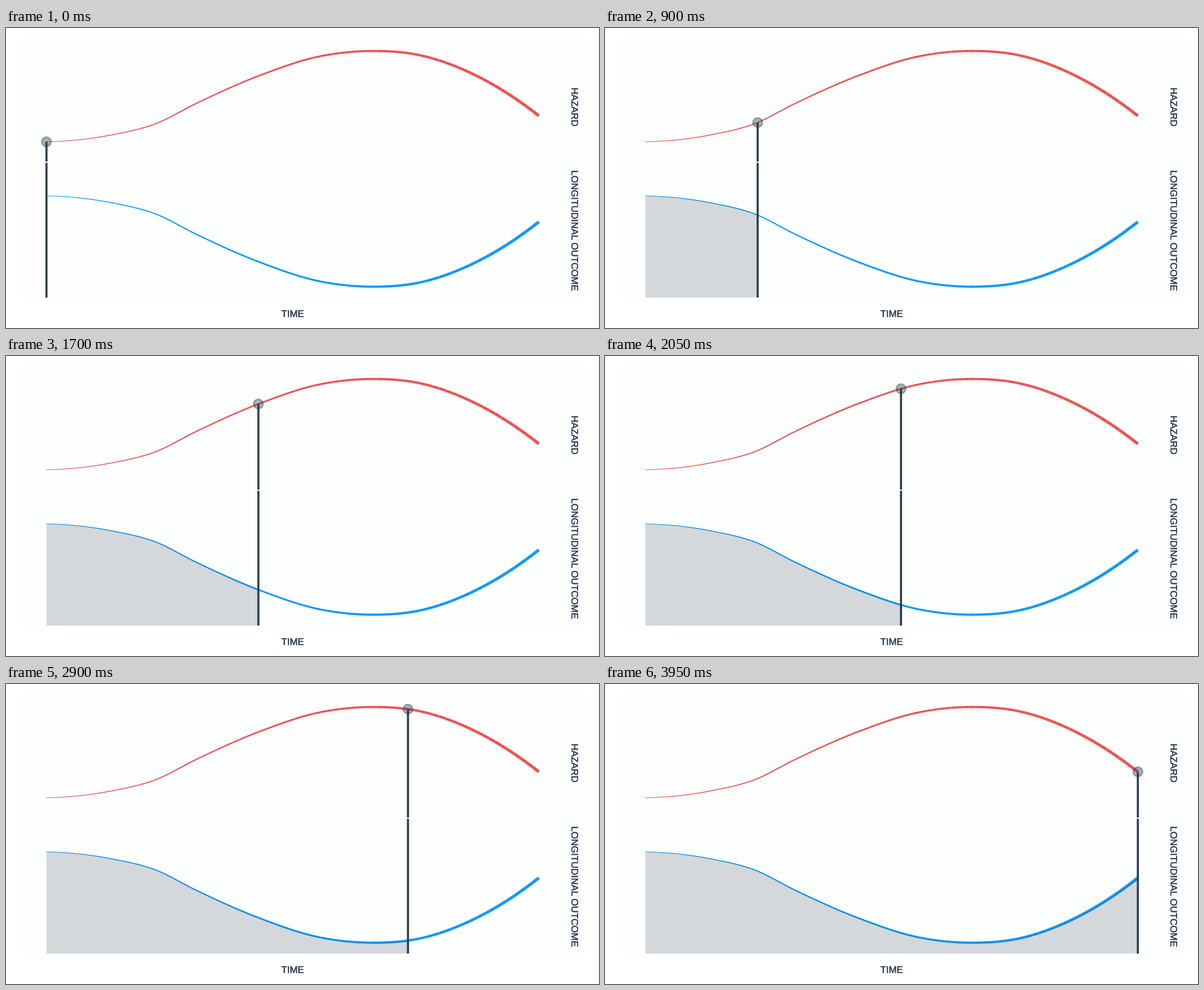
These frames come from a looping animation (1052x532 px, 4 s). A matplotlib script:

```python
import numpy as np
import matplotlib.pyplot as plt
from matplotlib.animation import FuncAnimation
from matplotlib.collections import LineCollection
from matplotlib.patches import Circle, Polygon, Rectangle
from matplotlib.patheffects import withStroke

W, H, DPI = 1052, 532, 100
PX = 72 / DPI
FRAMES, STEP = 80, 50
LEFT, RIGHT = 71.8, 945.3
GAP_TOP, GAP_BOTTOM, FLOOR = 237, 239, 478
MIRROR = 499.5
RED, BLUE, NAVY, PANEL = "#ea5455", "#1098f7", "#2c3e50", "#fdfefe"

# key points of the hazard curve, y pointing down
KEY_X = np.array([72, 193, 265, 337, 448, 558, 648, 740, 813, 945])
KEY_Y = np.array([201.8, 188.5, 170, 134, 85, 50, 40.8, 49.5, 74.5, 155.5])


def smooth(x):
    """Cubic Hermite curve whose slopes come from parabolas through neighbours."""
    slope = np.gradient(KEY_Y, KEY_X, edge_order=2)
    i = np.clip(np.searchsorted(KEY_X, x, side="right") - 1, 0, len(KEY_X) - 2)
    h = KEY_X[i + 1] - KEY_X[i]
    t = (x - KEY_X[i]) / h
    s = 1 - t
    return (s * s * ((1 + 2 * t) * KEY_Y[i] + t * h * slope[i])
            + t * t * ((1 + 2 * s) * KEY_Y[i + 1] - s * h * slope[i + 1]))


xs = np.linspace(LEFT, RIGHT, FRAMES)
hazard = smooth(xs)
outcome = MIRROR - hazard

plt.rcParams["text.hinting"] = "none"
fig = plt.figure(figsize=(W / DPI, H / DPI), dpi=DPI, facecolor="white")
ax = fig.add_axes([0, 0, 1, 1])
ax.set_xlim(0, W)
ax.set_ylim(H, 0)
ax.axis("off")
ax.add_patch(Rectangle((24, 16), 1008, 464, fc=PANEL, lw=0, zorder=0))


def tapered(ys, color):
    pts = np.column_stack([xs, ys])
    widths = np.linspace(1.0, 5.4, FRAMES - 1) * PX
    ax.add_collection(LineCollection(
        np.stack([pts[:-1], pts[1:]], axis=1), colors=color,
        linewidths=widths, capstyle="butt", zorder=1), autolim=False)


def label(x, y, text, angle=0):
    ax.text(x, y, text, family="Liberation Sans", size=16.8 * PX, color=NAVY,
            ha="center", va="baseline", rotation=angle, rotation_mode="anchor",
            path_effects=[withStroke(linewidth=0.4 * PX, foreground=NAVY)])


def stem():
    line, = ax.plot([], [], color=NAVY, lw=3.7 * PX, solid_capstyle="butt",
                    snap=False, zorder=3)
    return line


tapered(hazard, RED)
tapered(outcome, BLUE)
label(508.5, 512.3, "TIME")
label(1003.2, 140, "HAZARD", 270)
label(1003.2, 359, "LONGITUDINAL OUTCOME", 270)

area = ax.add_patch(Polygon([(LEFT, FLOOR)] * 3, fc=NAVY, alpha=0.195, lw=0,
                            zorder=2))
upper, lower = stem(), stem()
marker = ax.add_patch(Circle((LEFT, hazard[0]), 8.4, fc=NAVY, ec=NAVY,
                             alpha=0.4, lw=2.4 * PX, zorder=4))


def draw(i):
    x, y = xs[i], hazard[i]
    top = np.column_stack([xs[:i + 1], outcome[:i + 1]])
    area.set_xy(np.vstack([(LEFT, FLOOR), top, (x, FLOOR)]))
    upper.set_data([x, x], [y, GAP_TOP])
    lower.set_data([x, x], [GAP_BOTTOM, FLOOR])
    marker.center = (x, y)
    return area, upper, lower, marker


anim = FuncAnimation(fig, draw, frames=FRAMES, interval=STEP, repeat=True,
                     repeat_delay=0, init_func=lambda: draw(0))
plt.show()
```
